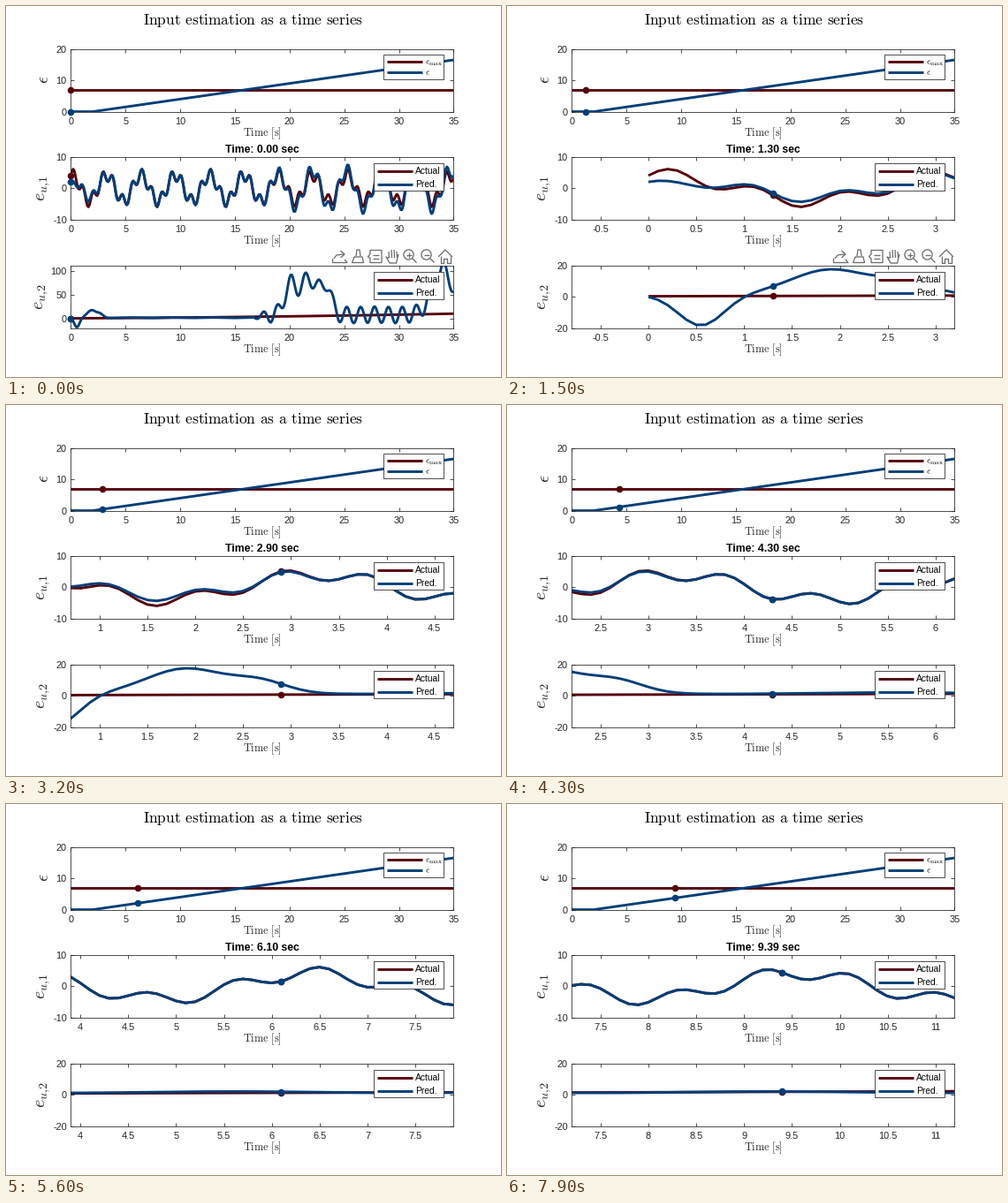
A matplotlib script for the animation above (8 s loop, 560 by 420 pixels).

```python
import numpy as np
import matplotlib.pyplot as plt
from matplotlib.animation import FuncAnimation
from matplotlib.patches import Circle, Rectangle
from matplotlib.ticker import MultipleLocator

W, H, DPI = 560, 420, 80
PT = 72 / DPI  # points per pixel
FRAMES, INTERVAL = 80, 100
DT = 0.09994
RED, BLUE, INK, ICON = "#56000a", "#003e78", "#262626", "#6e6e6e"
LINE, THIN = 2.9 * PT, 0.8 * PT
LEFT, RIGHT, HEIGHT = 73.4, 506.4, 71
TOPS = 48.6, 170.6, 293.6
TOOLBAR_FRAMES = 20

plt.rcParams.update({
    "font.family": "Liberation Sans",
    "mathtext.fontset": "cm",
    "axes.unicode_minus": False,
    "lines.solid_capstyle": "butt",
})


def bumps(x, *parts):
    """Sum of bell curves given as (height, centre, width)."""
    return sum(a * np.exp(-((x - c) / w) ** 2 / 2) for a, c, w in parts)


def ramp(x, start, length):
    return np.clip((x - start) / length, 0, 1)


# Signals: the estimate settles early and drifts off again late
t = np.arange(351) * DT
eps_max = np.full_like(t, 7.0)
eps = 0.5 * np.clip(t - 2, 0, None)

actual1 = 4 * np.cos(2 * t) + np.sin(2 * t) + 2 * np.sin(7 * t)
pred1 = (actual1
         + bumps(t, (-3.9, .25, .22), (1, .8, .2), (1.6, 1.6, .22),
                 (.7, 2.35, .2), (-.3, 3, .2))
         + ramp(t, 17.5, 4) * (1.9 * np.cos(2 * (t - 22)) - 0.3))

actual2 = 0.3 + 0.12 * t + 0.0045 * t ** 2
pred2 = (1.6 + 0.45 * np.cos(1.7 * (t - 5.6))
         + bumps(t, (-19.7, .55, .235), (15.3, 1.9, .4), (7.2, 2.68, .28),
                 (55, 20, .5), (76, 21.8, .9), (50, 23.4, .4), (94, 34, .95))
         + ramp(t, 16.5, 2) * (6 + 17 * np.cos(4.95 * (t - 26.5))))

# Sample reached in each frame; the pace quickens
index = np.rint(np.interp(np.arange(FRAMES), [1, 31, 32, 43, 68, 79],
                          [0, 27, 29, 43, 77, 94])).astype(int)

fig = plt.figure(figsize=(W / DPI, H / DPI), dpi=DPI, facecolor="white")


def panel(top, first, second, ylim, ystep):
    ax = fig.add_axes([LEFT / W, 1 - (top + HEIGHT) / H,
                       (RIGHT - LEFT) / W, HEIGHT / H])
    ax.set(xlim=(0, 35), ylim=ylim)
    for axis, step in ((ax.xaxis, 5), (ax.yaxis, ystep)):
        axis.set_major_locator(MultipleLocator(step))
        axis.set_major_formatter("{x:g}")
    ax.tick_params(direction="in", length=4 * PT, width=THIN, color=INK,
                   labelcolor=INK, labelsize=11 * PT, top=True, right=True)
    ax.tick_params(axis="x", pad=6.3 * PT)
    ax.tick_params(axis="y", pad=4.5 * PT)
    for spine in ax.spines.values():
        spine.set(color=INK, linewidth=THIN)
    dots = []
    for data, color in ((first, RED), (second, BLUE)):
        ax.plot(t, data, color=color, lw=LINE)
        dot, = ax.plot([], [], "o", color=color, ms=7.6 * PT, mew=0,
                       clip_on=False, zorder=4)
        dots.append((dot, data))
    return ax, dots


ax1, dots1 = panel(TOPS[0], eps_max, eps, (0, 20), 10)
ax2, dots2 = panel(TOPS[1], actual1, pred1, (-10, 10), 10)
ax3, dots3 = panel(TOPS[2], actual2, pred2, (-20, 111), 50)

# Overlay in pixel coordinates
over = fig.add_axes([0, 0, 1, 1], zorder=5)
over.set(xlim=(0, W), ylim=(H, 0))
over.axis("off")


def label(x, y, s, size, **kw):
    kw = {"ha": "center", "va": "baseline", "color": INK, **kw}
    return over.text(x, y, s, fontsize=size * PT, **kw)


def roman(s):
    return r"$\mathrm{" + s.replace(" ", r"\hspace{0.38}") + "}$"


def ylabel(x, y, s):
    return label(x, y, s, 20, rotation=90, rotation_mode="anchor")


def legend(x, y, w, h, pad, gap, line, names, size):
    over.add_patch(Rectangle((x, y), w, h, fc="white", ec=INK, lw=THIN))
    for k, (name, color) in enumerate(zip(names, (RED, BLUE))):
        row = y + pad + k * gap
        over.plot([x + 4, x + 4 + line], [row, row], color=color, lw=LINE)
        label(x + 7 + line, row + 3.5, name, size, ha="left", color="black")


label(280, 21, roman("Input estimation as a time series"), 17.3, color="black")
for top in TOPS:
    label(290, top + 98.5, roman("Time [s]"), 12.2)
ylabel(48, 83, r"$\epsilon$")
ylabel(44, 206, r"$e_{u{,}1}$")
ylabel3 = ylabel(44, 329, r"$e_{u{,}2}$")
clock = label(290, 166, "", 12.3, weight="bold", color="black")

legend(427.4, 54.6, 68, 28, 8, 12, 40,
       (r"$\epsilon_{\mathrm{max}}$", r"$\epsilon$"), 10.6)
for top in TOPS[1:]:
    legend(416.4, top + 7, 79, 31.5, 9, 15, 39.5, ("Actual", "Pred."), 10.3)

toolbar = []


def stroke(*pts):
    toolbar.extend(over.plot(*zip(*pts), color=ICON, lw=1.3 * PT))


def zoom(x, y=281.5):
    toolbar.append(over.add_patch(
        Circle((x, y), 5.6, fill=False, ec=ICON, lw=1.3 * PT)))
    stroke((x + 4, y + 4), (x + 9, y + 9))
    stroke((x - 3, y), (x + 3, y))


# Export
stroke((369.5, 286), (369.5, 290.5), (386, 290.5), (383, 287))
stroke((371, 286), (374, 282), (382, 281))
stroke((378.5, 277), (383, 281), (378.5, 285))
# Brush
stroke((396, 283), (397, 276), (400, 276), (401, 283))
stroke((394, 284), (403, 284), (404.5, 290.5), (391.5, 290.5), (394, 284))
# Data tip
stroke((412, 281), (412, 276.5), (425, 276.5), (425, 290.5), (412, 290.5),
       (412, 286), (409.5, 283.5), (412, 281))
for y in (281.5, 285.5):
    stroke((415, y), (422, y))
# Hand
stroke((433.5, 285.5), (430, 284), (434, 291), (441.5, 291), (444, 281))
for x, y in ((433, 278), (436, 276), (439, 276), (442, 278)):
    stroke((x, y), (x + 0.5, 285))
# Zoom in, zoom out
zoom(455.5)
stroke((455.5, 278.5), (455.5, 284.5))
zoom(475.5)
# Home
stroke((489, 284), (497, 276), (505, 284))
stroke((491.5, 282.5), (491.5, 290.5), (495, 290.5), (495, 285.5),
       (499, 285.5), (499, 290.5), (502.5, 290.5), (502.5, 282.5))


def update(n):
    i = index[n]
    for dot, data in dots1 + dots2 + dots3:
        dot.set_data([t[i]], [data[i]])
    clock.set_text(f"Time: {t[i]:.2f} sec")

    # The view follows the previous sample
    mid = round(t[index[n - 1]], 1)
    xlim, xstep = ((mid - 2, mid + 2), 0.5) if n else ((0, 35), 5)
    for ax in (ax2, ax3):
        ax.set_xlim(xlim)
        ax.xaxis.set_major_locator(MultipleLocator(xstep))
    ax3.set_ylim(-20, 20 if n else 111)
    ax3.yaxis.set_major_locator(MultipleLocator(20 if n else 50))
    ylabel3.set_x(44 if n else 42)

    for part in toolbar:
        part.set_visible(n < TOOLBAR_FRAMES)
    return []


anim = FuncAnimation(fig, update, frames=FRAMES, interval=INTERVAL,
                     repeat=True, repeat_delay=0)
plt.show()
```
